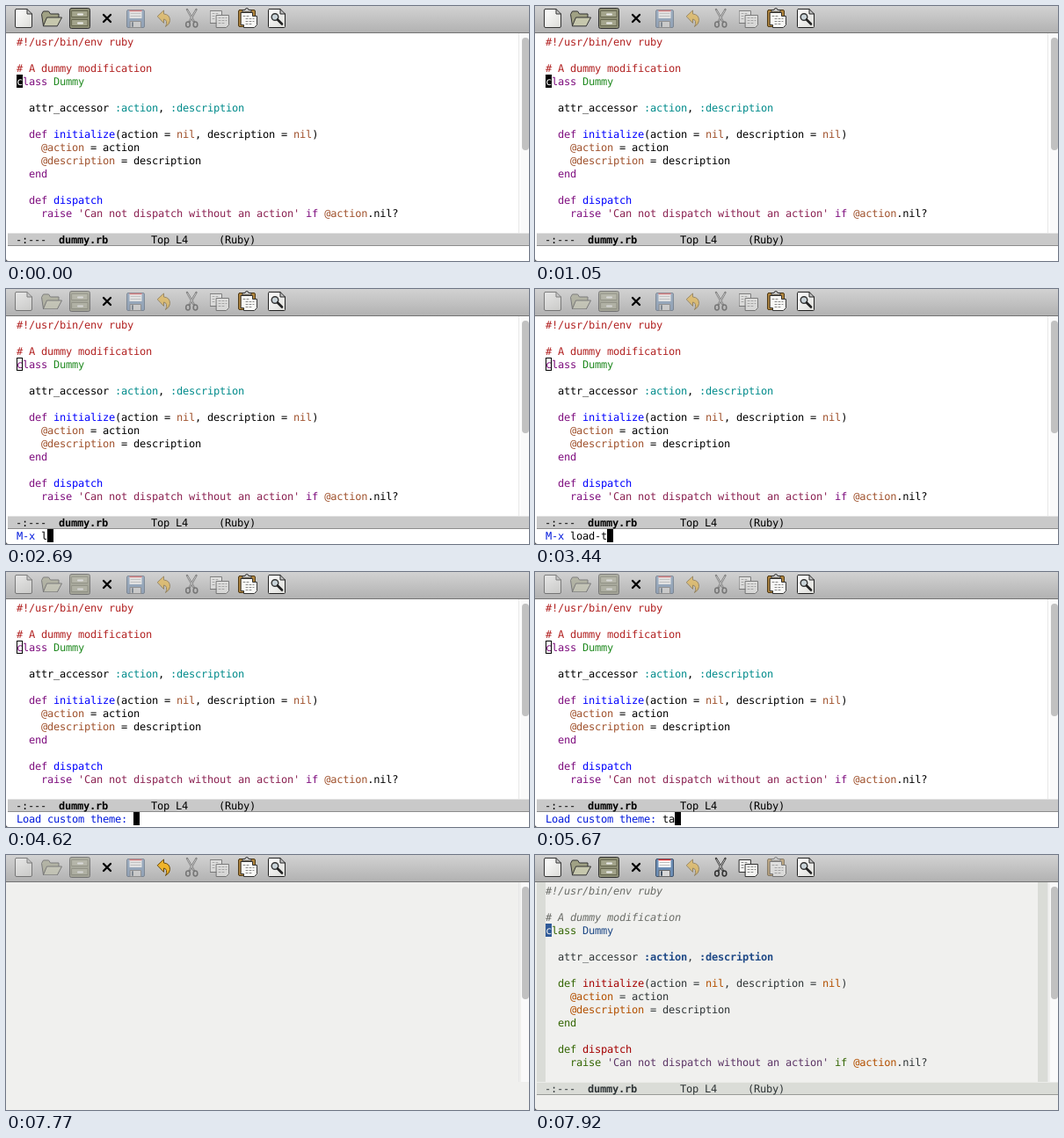
Animation of 595 by 290 pixels, one loop 8 s. Source, as an HTML page:

```html
<!DOCTYPE html>
<html lang="en">
<head>
<meta charset="utf-8">
<title>Loading an editor theme</title>
<style>
html, body { margin: 0; width: 100%; height: 100%; overflow: hidden; }
svg {
  display: block;
  --bg: #fff; --fg: #000; --cursor: #000; --fringe: #fff; --bar: #c9c9c9;
  --comment: #b22222; --keyword: #7f0f7f; --type: #228b22; --constant: #008b8b;
  --variable: #a0522d; --function: #0000ff; --string: #8b2252;
}
svg.tango {
  --bg: #f0f0ee; --fg: #2e3436; --cursor: #2f5a98; --fringe: #dadcd7; --bar: #dadcd7;
  --comment: #6b6d68; --keyword: #346604; --type: #204a87; --constant: #204a87;
  --variable: #b35000; --function: #a40000; --string: #5c3566;
}
text {
  font: 12px "DejaVu Sans Mono", "Liberation Mono", monospace;
  letter-spacing: -.224px; /* 7px character grid */
  white-space: pre; text-rendering: geometricPrecision; fill: var(--fg);
}
.bg { fill: var(--bg); }
.cursor { fill: var(--cursor); }
.fringe { fill: var(--fringe); }
.bar { fill: var(--bar); }
.c { fill: var(--comment); }
.k { fill: var(--keyword); }
.t { fill: var(--type); }
.n { fill: var(--constant); }
.v { fill: var(--variable); }
.f { fill: var(--function); }
.s { fill: var(--string); }
.tango .c { font-style: italic; }
.tango .n, .bold { font-weight: bold; }
.prompt { fill: #0018dc; }
#icons { stroke: #333; stroke-linejoin: round; stroke-linecap: round; }
</style>
</head>
<body>
<svg id="stage" width="595" height="290" viewBox="0 0 595 290">
  <defs>
    <linearGradient id="tool" x2="0" y2="1">
      <stop stop-color="#d2d2d2"/><stop offset="1" stop-color="#b2b2b2"/>
    </linearGradient>
    <linearGradient id="paper" x2="1" y2="1">
      <stop stop-color="#fff"/><stop offset="1" stop-color="#dcdcd8"/>
    </linearGradient>
  </defs>
  <rect class="bg" width="595" height="290"/>
  <rect width="595" height="30" fill="url(#tool)"/>
  <rect y="30" width="595" height="1" fill="#737373"/>

  <g id="icons" fill="none">
    <path d="M11.500 3.500h12.500l5.500 5.500v14q0 1.500-1.500 1.500h-16q-1.500 0-1.500-1.500v-18q0-1.500 1-1.500zM24 3.500v5.500h5.500" fill="url(#paper)"/>
    <g>
      <path d="M42.500 22.500l-2-13 2-3.500h6l2 3h9.500v4" fill="#a0a184"/>
      <path d="M42.500 22.500l4-9.500h17l-5 9.500z" fill="#c6c7ad"/>
    </g>
    <g>
      <rect x="72.500" y="2.500" width="23" height="23" rx="2" fill="#8c8d74"/>
      <path d="M75 5.500h18v7h-18zM75 15.500h18v7h-18z" fill="#a3a48b" stroke="#66674f"/>
      <path d="M82 9.500h5M82 19.500h5" stroke="#eee" stroke-width="2"/>
    </g>
    <path d="M111 10l8 8M119 10l-8 8" stroke="#000" stroke-width="2.300"/>
    <g>
      <rect x="137.500" y="4.500" width="20" height="20" rx="1.500" fill="#6c8db4" stroke="#40546d"/>
      <path d="M140.500 5h14v9h-14z" fill="#fff" stroke="none"/>
      <path d="M141 5.500h13" stroke="#d33" stroke-width="1.500"/>
      <path d="M142 8.500h11M142 11.500h11" stroke="#bbb"/>
      <path d="M141.500 17.500h12v7h-12z" fill="#d8d8d8" stroke="#666"/>
      <path d="M144 19v4" stroke="#456" stroke-width="2"/>
    </g>
    <path d="M172.500 11.500l7-6.500v4q7 .5 7 7.500 0 4-5 7 2-3 1-6-.8-2.500-3-2.500v4z" fill="#f0b429" stroke="#6b4a08"/>
    <g>
      <path d="M206 4l8 14M216.500 4l-8 14" stroke="#333" stroke-width="2.400"/>
      <path d="M206.500 5l7 12M216 5l-7 12" stroke="#ddd" stroke-width=".8"/>
      <ellipse cx="207" cy="21" rx="2.300" ry="3" stroke-width="1.600"/>
      <ellipse cx="215.500" cy="21" rx="2.300" ry="3" stroke-width="1.600"/>
    </g>
    <g>
      <path d="M232.500 5.500h13v14h-13z" fill="#f4f4f2"/>
      <path d="M235 8.500h8M235 11.500h4M235 14.500h4" stroke="#888" stroke-dasharray="2 2"/>
      <path d="M239.500 10.500h14v11l-3 3h-11z" fill="#f4f4f2"/>
      <path d="M242 13.500h9M242 16.500h9M242 19.500h8" stroke="#888" stroke-dasharray="2 2"/>
    </g>
    <g>
      <rect x="264.500" y="4.500" width="19" height="19" rx="1.500" fill="#b0853e" stroke="#4e3a17"/>
      <path d="M269 6.500v-2h3q0-2 2-2t2 2h3v2z" fill="#ccc"/>
      <path d="M267.500 7.500h13v4h5v10l-3 3h-12v-3h-3z" fill="#f8f8f6"/>
      <path d="M270 11.500h8M273 14.500h9M273 17.500h9M273 20.500h7" stroke="#888" stroke-dasharray="2 2"/>
    </g>
    <g>
      <path d="M299.500 3.500h12.500l5.500 5.500v14.500q0 1-1 1h-17q-1 0-1-1v-19q0-1 1-1zM312 3.500v5.500h5.500" fill="url(#paper)" stroke="#222"/>
      <circle cx="306" cy="12.500" r="3.800" fill="#c9d3d8" stroke-width="1.400"/>
      <path d="M309 15.500l5 5" stroke="#222" stroke-width="2.600"/>
    </g>
  </g>

  <path d="M583.500 31v227" stroke="#e6e6e6"/>
  <path d="M586 31h9v227h-9z" fill="#fafafa"/>
  <rect x="587" y="36" width="8" height="128" rx="4" fill="#c1c1c1"/>

  <g id="frame">
    <path class="fringe" d="M2 31h10v227h-10zM572 31h11v227h-11z"/>
    <g id="code"></g>
    <g id="block">
      <rect class="cursor" x="12" y="78" width="7" height="15"/>
      <text class="bg" x="12" y="90" style="fill:var(--bg)">c</text>
    </g>
    <rect id="hollow" x="12.500" y="78.500" width="6" height="14" fill="none" stroke="#000"/>
    <rect class="bar" x="2" y="258" width="593" height="15"/>
    <path d="M2 258.500h593" stroke="#fff" stroke-opacity=".45"/>
    <path d="M2 272.500h593" stroke="#000" stroke-opacity=".3"/>
    <text x="11" y="270">-:---  <tspan class="bold">dummy.rb</tspan>       Top L4     (Ruby)</text>
    <text x="12" y="285"><tspan id="prompt" class="prompt"></tspan><tspan id="input"></tspan></text>
    <rect id="caret" y="273" width="7" height="15"/>
    <path d="M0 287q0 3 3 3h-3z" fill="#444"/>
  </g>
</svg>
<script>
const $ = id => document.getElementById(id);

// {x text} colours the text with class x
const source = `{c #!/usr/bin/env ruby}

{c # A dummy modification}
{k class} {t Dummy}

  attr_accessor {n :action}, {n :description}

  {k def} {f initialize}(action = {v nil}, description = {v nil})
    {v @action} = action
    {v @description} = description
  {k end}

  {k def} {f dispatch}
    {k raise} {s 'Can not dispatch without an action'} {k if} {v @action}.nil?`;

$('code').innerHTML = source.split('\n').map((line, i) =>
  `<text x="12" y="${45 + 15 * i}">` +
  line.replace(/{(\w) (.*?)}/g, '<tspan class="$1">$2</tspan>') + '</text>').join('');

const LOOP = 8000, OPEN = 1650, LOAD = 4620, HINT = 6270, BLANK = 7770, THEMED = 7920;
const COMMAND = 'load-theme', THEME = 'tango';
const commandKeys = [2690, 2840, 2840, 2990, 3290, 3440, 3580, 3730, 3880, 4030];
const themeKeys = [5370, 5670, 5820, 5970, 6120];

const within = (t, from, to) => t >= from && t < to;
const typed = (text, keys, t) => text.slice(0, keys.filter(k => t >= k).length);
const show = (id, on) => $(id).setAttribute('visibility', on ? 'inherit' : 'hidden');

// One digit per toolbar icon: 1 enabled, 0 dimmed
const enabledIcons = t =>
  t < OPEN ? '1111000011' : t < HINT ? '0001000011' :
  t < THEMED ? '0001010011' : '1111101101';

function draw(t) {
  const mini = within(t, OPEN, BLANK);
  const prompt = !mini ? '' : t < LOAD ? 'M-x ' : 'Load custom theme: ';
  const input = !mini ? '' : t < LOAD ? typed(COMMAND, commandKeys, t) : typed(THEME, themeKeys, t);

  $('stage').classList.toggle('tango', t >= BLANK);
  $('frame').style.display = within(t, BLANK, THEMED) ? 'none' : '';
  $('prompt').textContent = prompt;
  $('input').textContent = input + (mini && t >= HINT ? ' [Complete, but not unique]' : '');
  $('caret').setAttribute('x', 12 + 7 * (prompt + input).length);
  show('caret', mini && !within(t, 2100, 2540) && !within(t, 5220, 5370));
  show('block', !mini && !within(t, 600, 1050));
  show('hollow', mini);

  const enabled = enabledIcons(t);
  [...$('icons').children].forEach((icon, i) =>
    icon.setAttribute('opacity', enabled[i] === '1' ? 1 : .5));
}

const start = performance.now();
function tick() {
  draw((performance.now() - start) % LOOP);
  requestAnimationFrame(tick);
}
tick();
</script>
</body>
</html>
```
